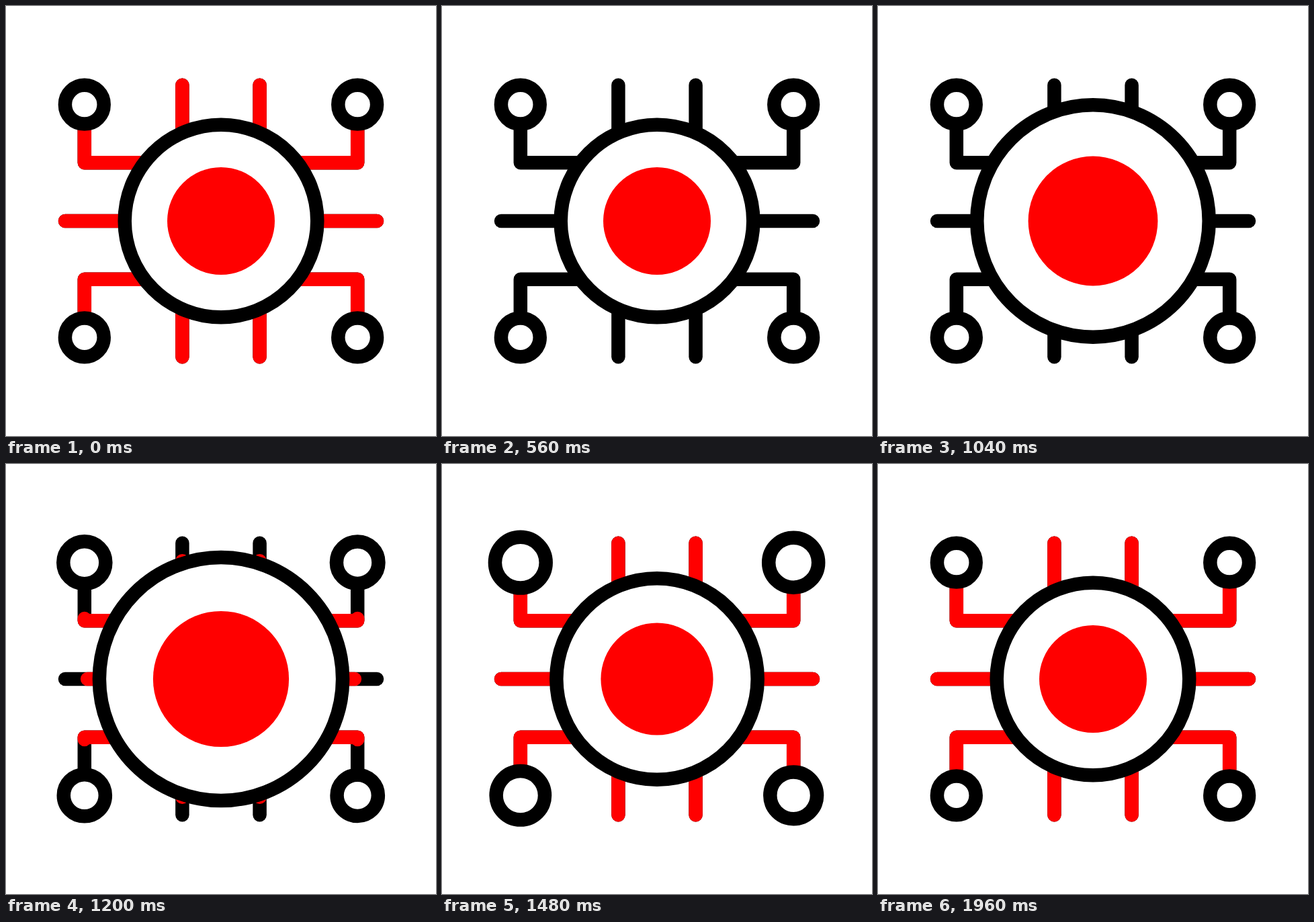
Recreate the animation shown at these times as an HTML page. Size 640x640 px, loop 2.08 s.

```html
<!DOCTYPE html>
<html lang="en">
<head>
<meta charset="utf-8">
<title>Circuit coin</title>
<style>
  html, body { margin: 0; width: 100%; height: 100%; overflow: hidden; background: #fff; }
  svg { display: block; width: 100%; height: 100%; }
  path { fill: none; stroke: #000; }
  path, .ring { stroke-width: 20.5; stroke-linecap: round; stroke-linejoin: round; }
  .red { stroke: #f00; }
  .ring { fill: #fff; stroke: #000; }
</style>
</head>
<body>
<svg viewBox="0 0 640 640"></svg>
<script>
const LOOP = 2080, C = 320, RING = 143.3, NODE = 28.9;
const svg = document.querySelector('svg');

function add(tag, attrs) {
  const el = document.createElementNS('http://www.w3.org/2000/svg', tag);
  for (const key in attrs) el.setAttribute(key, attrs[key]);
  return svg.appendChild(el);
}

// Smooth 0 to 1 between two times
function ease(t, from, to) {
  const x = Math.min(1, Math.max(0, (t - from) / (to - from)));
  return x * x * (3 - 2 * x);
}
const pulse = (t, from, peak, to) => ease(t, from, peak) - ease(t, peak, to);

// Wires run outward from the ring, as offsets from the centre
const corners = [[-1, -1], [1, -1], [-1, 1], [1, 1]];
const wires = [];
for (const [sx, sy] of corners) {
  wires.push(`M${C + sx * 114} ${C + sy * 86.7}H${C + sx * 203.2}V${C + sy * 145}`);
  wires.push(`M${C + sx * 57.6} ${C + sy * 131}V${C + sy * 202.3}`);
}
for (const sx of [-1, 1]) wires.push(`M${C + sx * RING} ${C}H${C + sx * 232}`);

wires.forEach(d => add('path', { d }));
const reds = wires.map(d => add('path', { d, class: 'red', pathLength: 1 }));

const growth = [9, 8.1, 7.3, 6];
const nodes = corners.map(([sx, sy]) =>
  add('circle', { cx: C + sx * 203.2, cy: C + sy * 173.3, class: 'ring' }));
const ring = add('circle', { cx: C, cy: C, class: 'ring' });
const coin = add('circle', { cx: C, cy: C, fill: '#f00' });

function draw(now) {
  const t = now % LOOP;

  // Red drains outward, then refills outward from the ring
  const drained = ease(t, 80, 560), filled = ease(t, 920, 1400);
  const from = drained < 1 ? drained : 0;
  const length = drained < 1 ? 1 - drained : filled;
  for (const wire of reds) {
    wire.setAttribute('stroke-dasharray', `${length} 2`);
    wire.setAttribute('stroke-dashoffset', -from);
    wire.setAttribute('visibility', length > 0.001 ? 'visible' : 'hidden');
  }

  const scale = 1 + 0.268 * pulse(t, 760, 1170, 1590);
  ring.setAttribute('r', RING * scale);
  coin.setAttribute('r', 80 * scale);

  const swell = pulse(t, 1040, 1490, 1960);
  nodes.forEach((node, i) => node.setAttribute('r', NODE + growth[i] * swell));
}

const start = performance.now();
function tick() {
  draw(performance.now() - start);
  requestAnimationFrame(tick);
}
tick();
</script>
</body>
</html>
```
